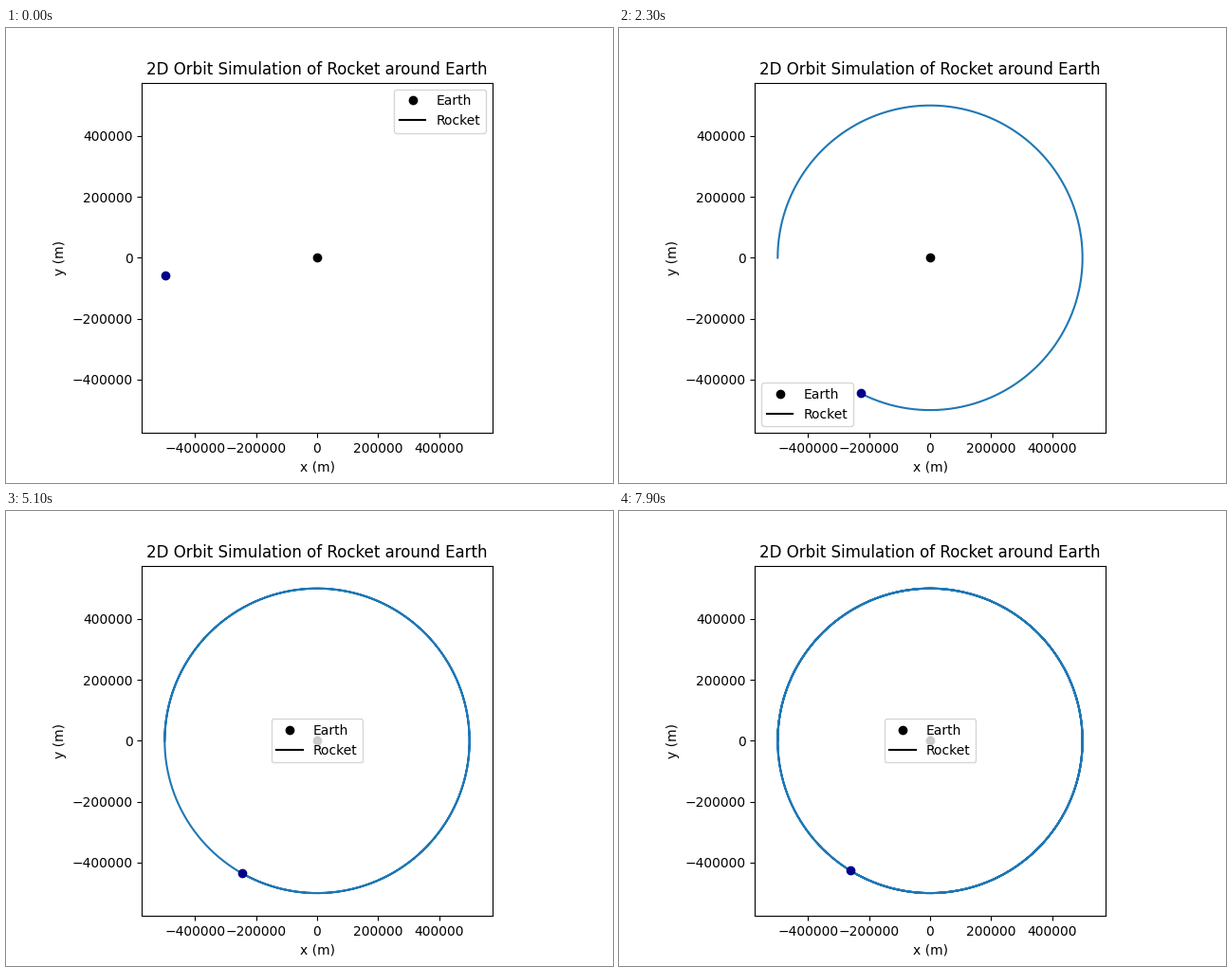
These frames come from a looping animation (640 px wide and 480 px high, 8 s). A matplotlib script:

```python
import numpy as np
import matplotlib.pyplot as plt
from matplotlib.animation import FuncAnimation

G, MASS, RADIUS = 6.67e-11, 5.97e24, 5e5
DT, STEPS, STRIDE = 0.1, 10000, 40
FRAMES, INTERVAL = 80, 100
LIMIT = 1.15 * RADIUS

# Clockwise circular orbit starting at the left
angle = np.sqrt(G * MASS / RADIUS**3) * DT * np.arange(STEPS)
x, y = -RADIUS * np.cos(angle), RADIUS * np.sin(angle)

fig, ax = plt.subplots(figsize=(6.4, 4.8), dpi=100)
ax.set_aspect("equal")
ax.set(xlim=(-LIMIT, LIMIT), ylim=(-LIMIT, LIMIT),
       xlabel="x (m)", ylabel="y (m)",
       title="2D Orbit Simulation of Rocket around Earth")
ticks = np.arange(-400000, 400001, 200000)
ax.set_xticks(ticks)
ax.set_yticks(ticks)

ax.plot(0, 0, "ko", label="Earth")
ax.plot([], [], "k-", label="Rocket")
trail, = ax.plot([], [], color="tab:blue")
rocket, = ax.plot([], [], "o", color="darkblue")
ax.legend(loc="best")


def update(frame):
    n = frame * STRIDE
    trail.set_data(x[:n], y[:n])
    # At n = 0 the marker sits on the last orbit point
    rocket.set_data([x[n - 1]], [y[n - 1]])
    return trail, rocket


anim = FuncAnimation(fig, update, frames=FRAMES, interval=INTERVAL,
                     repeat=True, repeat_delay=0)
plt.show()
```
